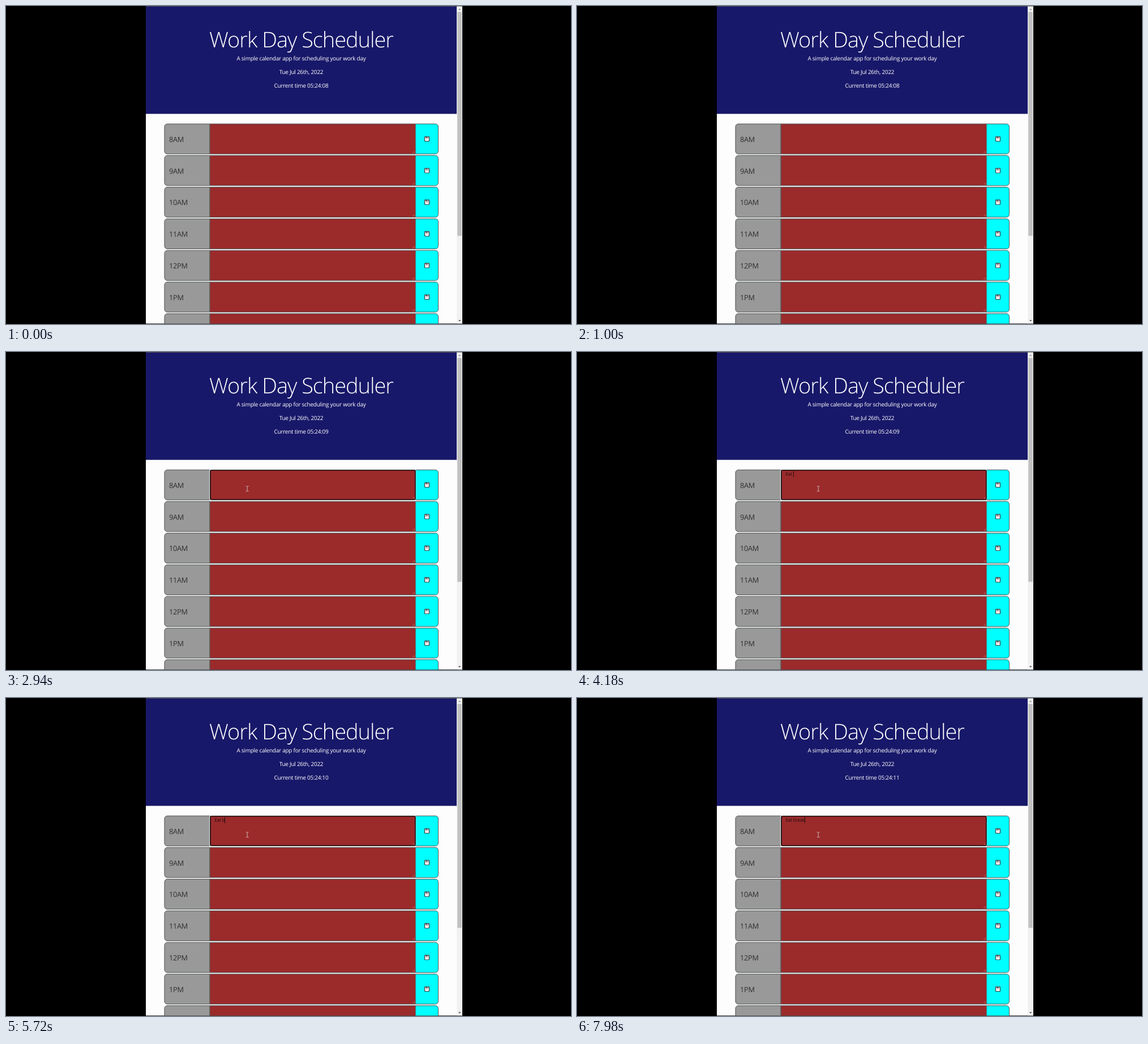
Recreate the animation shown at these times as an HTML page. Size 998 px wide and 561 px high, loop 8 s.

```html
<!DOCTYPE html>
<html lang="en">
<head>
<meta charset="utf-8">
<title>Work Day Scheduler</title>
<style>
  html, body { margin: 0; width: 100%; height: 100%; overflow: hidden; background: #000; }
  svg { position: absolute; left: 0; top: 0; display: block; }
  text, #entry { font-family: "Open Sans", "Noto Sans", sans-serif; text-rendering: geometricPrecision; }
  .head { fill: #fff; text-anchor: middle; font-size: 10px; letter-spacing: -.26px; }
  .title { font-size: 38px; font-weight: 300; letter-spacing: -1.05px; }
  .hour { fill: #303030; font-size: 12.8px; letter-spacing: -.3px; }
  #entry {
    position: absolute; left: 368.5px; top: 209px; height: 13px; line-height: 13px;
    font-size: 8px; letter-spacing: -.15px; white-space: pre; color: #1c0d0d;
  }
  #caret { display: inline-block; width: 1px; height: 11px; margin-right: -1px; vertical-align: -2.5px; background: #241010; }
</style>
</head>
<body>
<svg width="998" height="561" viewBox="0 0 998 561">
  <defs>
    <g id="row">
      <path d="M360 .5H285a5 5 0 0 0-5 5V48.5a5 5 0 0 0 5 5H360z" fill="#999"/>
      <path d="M360 .5H723.5V53.5H360z" fill="#9b2a2b"/>
      <path d="M723.5 .5H758.5a5 5 0 0 1 5 5V48.5a5 5 0 0 1-5 5H723.5z" fill="#0ff"/>
      <rect x="280" y=".5" width="483.5" height="53" rx="5" fill="none" stroke="#4c5050"/>
      <path d="M360 1V53" stroke="#5c5c5c" stroke-width="1.5"/>
      <path d="M723.5 1V53" stroke="#286a70" stroke-width=".7"/>
      <path d="M718 52.2l4-4M720.5 52.2l1.5-1.5" stroke="#c08a78" stroke-width=".7"/>
      <g transform="translate(739 22.5)">
        <rect x=".5" y=".5" width="8" height="8" rx=".8" fill="#e9e6e8" stroke="#34383c" stroke-width="1.1"/>
        <rect x="2.2" y=".5" width="4.6" height="2.4" fill="#45484c"/>
        <rect x="4.7" y=".9" width="1.2" height="1.5" fill="#eee"/>
        <rect x="2" y="4.6" width="5" height="3.4" fill="#fff"/>
        <path d="M2.4 4.7H6.6" stroke="#d98b8b" stroke-width=".7"/>
      </g>
    </g>
    <clipPath id="page"><rect x="247" y="0" width="559" height="560.3"/></clipPath>
  </defs>
  <rect width="998" height="561"/>
  <g clip-path="url(#page)">
    <rect x="247" width="559" height="561" fill="#fdfdfd"/>
    <rect x="247" y=".7" width="549.3" height="189.6" fill="#18186a"/>
    <path d="M247 .4H806" stroke="#222" stroke-width=".8"/>
    <text class="head title" x="521.5" y="73.3">Work Day Scheduler</text>
    <text class="head" x="521.5" y="96">A simple calendar app for scheduling your work day</text>
    <text class="head" x="521.5" y="120">Tue Jul 26th, 2022</text>
    <text class="head" x="521.5" y="144" id="clock"></text>
    <g id="rows"></g>
    <rect x="796.3" y=".8" width="9.7" height="560" fill="#f1f1f1"/>
    <rect x="797.3" y="10.5" width="7.7" height="395" fill="#c1c1c1"/>
    <path d="M799 7h4.4l-2.2-2.6z" fill="#8c8c8c"/>
    <path d="M799 554h4.4l-2.2 2.6z" fill="#505050"/>
  </g>
  <g id="focus" fill="none">
    <rect x="360" y="207.8" width="363.5" height="53.4" rx="2" stroke="#fff" stroke-width="1.6"/>
    <rect x="361" y="208.5" width="362" height="52" rx="1.5" stroke="#0a0405" stroke-width="1.6"/>
  </g>
  <g id="pointer" fill="none">
    <path d="M423.8 236.8h1.6l.8.6.8-.6h1.6M426.2 237.4V245M423.8 245.6h1.6l.8-.6.8.6h1.6" stroke="#d3c4bd" stroke-width=".9"/>
  </g>
</svg>
<div id="entry"><span id="typed"></span><span id="caret"></span></div>
<script>
  const LOOP = 8000;
  const CLICK = 1320, POINTER_IN = 1200, BLINK = 1500;
  const TICKS = [1600, 4600, 7600];
  const PHRASE = "Eat break";
  const KEYS = [3400, 3680, 3920, 4140, 5240, 6120, 6680, 7200, 7720];
  const byId = id => document.getElementById(id);
  const countPast = (times, t) => times.filter(at => at <= t).length;
  const show = (id, on) => { byId(id).style.visibility = on ? "visible" : "hidden"; };

  byId("rows").innerHTML = ["8AM", "9AM", "10AM", "11AM", "12PM", "1PM", "2PM"].map((hour, i) =>
    `<g transform="translate(0 ${207.5 + i * 55.8})"><use href="#row"/><text class="hour" x="288" y="32.3">${hour}</text></g>`
  ).join("");

  function draw(t) {
    const second = String(8 + countPast(TICKS, t)).padStart(2, "0");
    byId("clock").textContent = `Current time 05:24:${second}`;

    const typed = countPast(KEYS, t);
    byId("typed").textContent = PHRASE.slice(0, typed);

    // Every key press restarts the caret's blink.
    const lastInput = typed ? KEYS[typed - 1] : CLICK;
    const caretOn = Math.floor((t - lastInput) / BLINK) % 2 === 0;
    show("caret", t >= CLICK && caretOn);
    show("focus", t >= CLICK);
    show("pointer", t >= POINTER_IN);
  }

  function frame() {
    draw(performance.now() % LOOP);
    requestAnimationFrame(frame);
  }
  frame();
</script>
</body>
</html>
```
